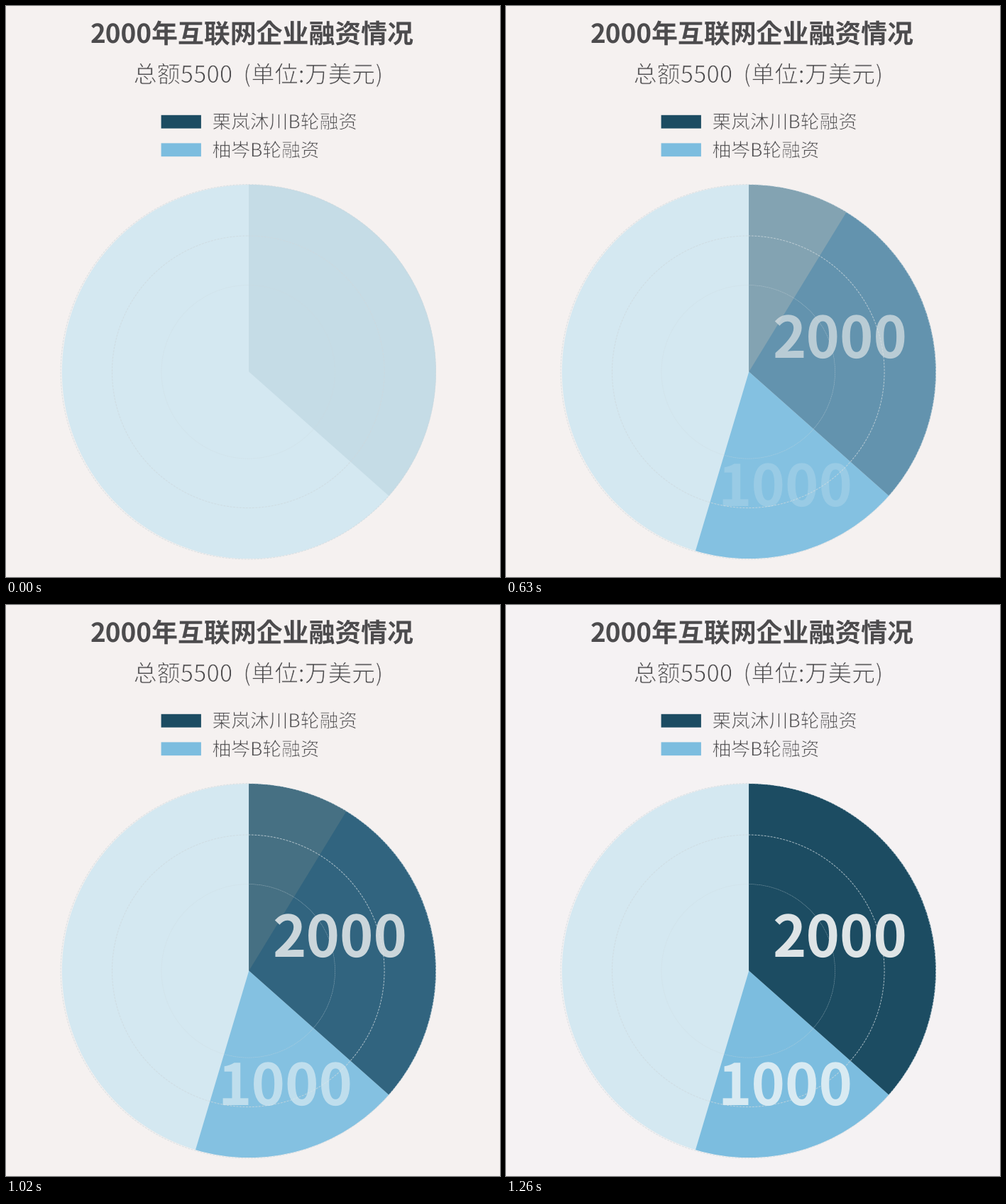
A matplotlib script that plays this animation: 696 px wide and 805 px high, repeating every 4.26 s.

```python
import numpy as np
import matplotlib.pyplot as plt
from matplotlib.animation import FuncAnimation
from matplotlib.patches import Circle, Rectangle, Wedge
from matplotlib.patheffects import Stroke

W, H, DPI = 696, 805, 64
PT = 72 / DPI  # points per pixel
STEP, LOOP = 30, 4260
SPLIT_START, SKY_FULL, FADE_END = 360, 1110, 1260

WARM, COOL = "#f5f1f0", "#f5f2f3"
INK, RING = "#4c4b4d", "#ced9de"
BASE = np.array([212, 232, 241]) / 255
NAVY = np.array([28, 76, 98]) / 255
SKY = np.array([124, 189, 223]) / 255
MID_TINT = np.array([0, 70, 140]) / 255
CENTRE, RADIUS = (342.3, 515.6), 263.5
SPLIT, NAVY_END, SKY_END = 31.4, 131.6, 196.6

plt.rcParams["font.family"] = ["Noto Sans CJK JP", "DejaVu Sans"]
plt.rcParams["text.hinting"] = "none"
fig = plt.figure(figsize=(W / DPI, H / DPI), dpi=DPI, facecolor=WARM)
ax = fig.add_axes([0, 0, 1, 1])
ax.set(xlim=(0, W), ylim=(H, 0))
ax.axis("off")


def label(x, y, text, size, color=INK, weight="bold"):
    return ax.text(x, y, text, fontsize=size * PT, color=color, weight=weight,
                   ha="left", va="baseline", zorder=5)


def thin_label(x, y, text, size):
    return label(x, y, text, size, weight="normal")


def trim(text, paper):
    """Thin the strokes of a label by outlining it in the paper colour."""
    width = .029 * text.get_fontsize()
    text.set_path_effects([Stroke(linewidth=width, foreground=paper)])


def swatch(y, color):
    ax.add_patch(Rectangle((218.6, y), 56.3, 18.8, fc=color, lw=0, snap=False))


def sector(start, end):
    return ax.add_patch(Wedge(CENTRE, RADIUS, start - 90, end - 90, lw=0))


def ring(radius, width, dash, alpha):
    ax.add_patch(Circle((341.3, 515.8), radius, fill=False, ec=RING,
                        lw=width * PT, ls=(0, (dash, dash / 2)),
                        alpha=alpha, zorder=3))


label(118.5, 52, "2000年互联网企业融资情况", 36.9)
thin = [
    thin_label(179.5, 108, "总额5500", 33.1),
    thin_label(334.2, 108, "(单位:万美元)", 33.1),
    thin_label(290.5, 172.5, "栗岚沐川B轮融资", 26.7),
    thin_label(290.5, 212.5, "柚岑B轮融资", 26.7),
]
swatch(153.8, NAVY)
swatch(193.4, SKY)

ax.add_patch(Circle(CENTRE, RADIUS, fc=BASE, lw=0))
sky = sector(NAVY_END, SKY_END)
navy = sector(0, NAVY_END)
late = sector(0, SPLIT)

ring(122.3, .7, 1.5, .5)
ring(191.8, 1, 3, .75)
ring(264.2, 1, 3, .7)

number_a = label(375, 496, "2000", 80.5, "#dee4e6")
number_b = label(298, 705, "1000", 80.5, "#d8eaf2")


def blend(color, s):
    return BASE + (color - BASE) * s


def sky_strength(t):
    if t >= SKY_FULL:
        return 1
    return min((t - 235) / 335, .91) if t >= SPLIT_START else 0


def update(frame):
    t = min(frame * STEP, FADE_END)
    if 60 <= t < 540:  # the slow start advances every second tick
        t -= t % 60
    u = t / FADE_END
    split = t >= SPLIT_START

    paper = COOL if t == FADE_END else WARM
    fig.set_facecolor(paper)
    for text in thin:
        trim(text, paper)

    ease_in = .08 + .92 * u ** 1.35
    ease_out = .08 + .92 * (1 - (1 - u) ** 1.25)
    s = ease_out if split else ease_in
    navy.set_facecolor(blend(NAVY, s) + MID_TINT * s * s * (1 - s) * split)
    late.set_facecolor(blend(NAVY, ease_in))
    sky.set_facecolor(blend(SKY, sky_strength(t)))

    number_a.set_alpha(u ** .5)
    number_b.set_alpha(max(0, (t - 420) / 840) if split else u ** .5)
    return [navy, late, sky, number_a, number_b]


anim = FuncAnimation(fig, update, frames=LOOP // STEP, interval=STEP,
                     repeat=True, repeat_delay=0, blit=False)
plt.show()
```
